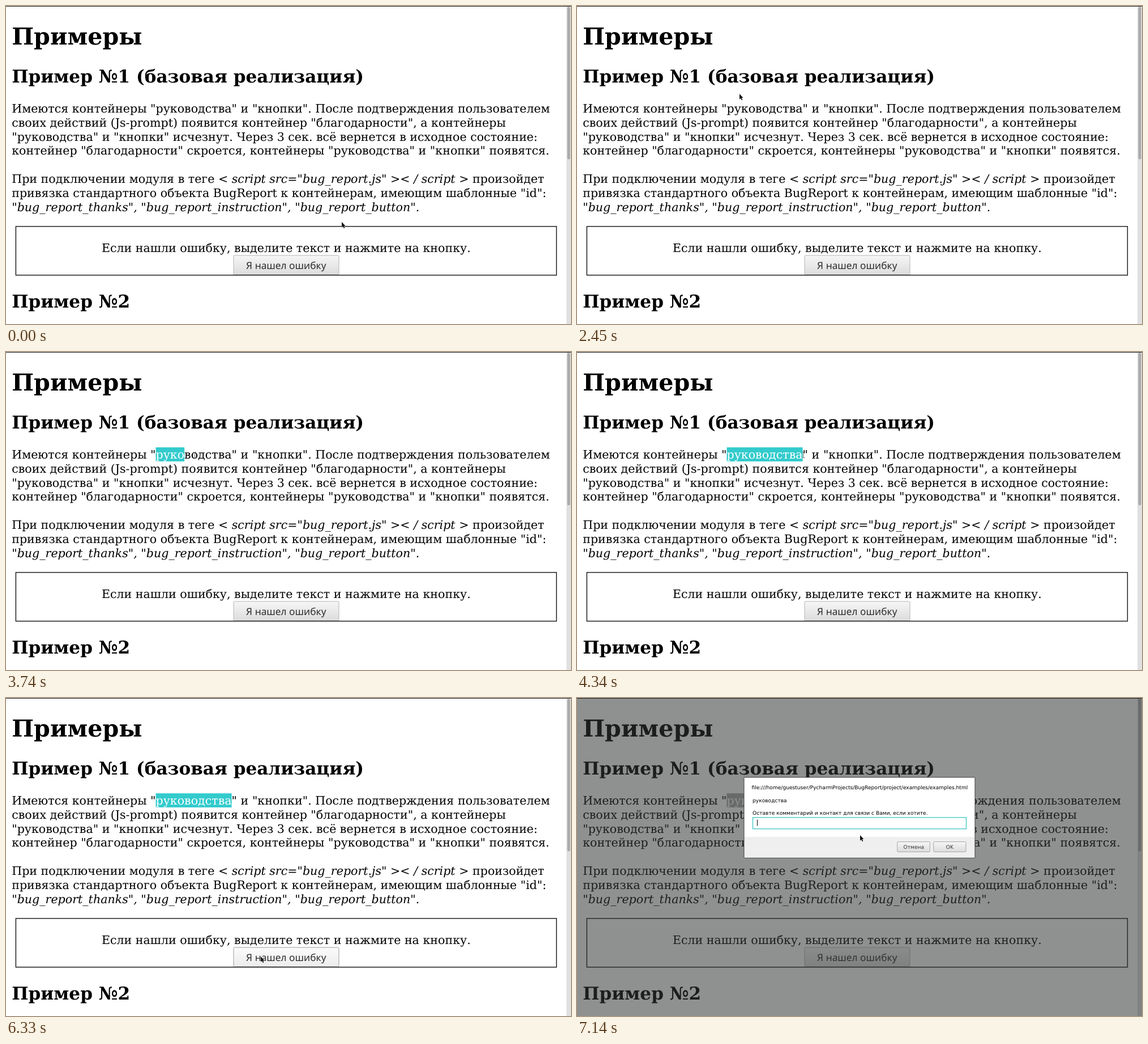
Animation of 998x561 px, one loop 8 s. Source, as an HTML page:

```html
<!DOCTYPE html>
<html lang="ru">
<head>
<meta charset="utf-8">
<title>Примеры</title>
<style>
  html, body { margin: 0; width: 100%; height: 100%; overflow: hidden; background: #fff; }
  svg { display: block; width: 100vw; height: 100vh; }
  text { text-rendering: geometricPrecision; }
  .page { font: 20.6px "DejaVu Serif", serif; }
  .h1 { font-size: 41.2px; font-weight: bold; }
  .h2 { font-size: 31.1px; font-weight: bold; }
  .it { font-style: italic; }
  .mid { text-anchor: middle; }
  .label { font: 17.3px "Noto Sans", "Open Sans", sans-serif; fill: #2c2c2c; }
  .button { fill: url(#face); stroke: #b4b4b4; }
  .pressed .button { fill: url(#light); stroke: #9c9c9c; }
  #mark { fill: #33cbcd; }
  .modal #mark { fill: #aaa; }
  #dialog { font: 9.1px "DejaVu Sans", sans-serif; visibility: hidden; }
  .modal #dialog { visibility: visible; }
  .small { fill: url(#face); stroke: #a6a6a6; }
</style>
</head>
<body>
<svg id="stage" viewBox="0 0 998 561" preserveAspectRatio="none">
  <defs>
    <linearGradient id="face" x2="0" y2="1">
      <stop stop-color="#f6f6f6"/><stop offset="1" stop-color="#dcdcdc"/>
    </linearGradient>
    <linearGradient id="light" x2="0" y2="1">
      <stop stop-color="#fbfbfb"/><stop offset="1" stop-color="#ececec"/>
    </linearGradient>
    <clipPath id="clip"><rect id="clipBox" y="168.2" width="0" height="24.8"/></clipPath>
  </defs>

  <rect width="998" height="561" fill="#fff"/>

  <g class="page">
    <text class="h1" x="10.2" y="68.4">Примеры</text>
    <text class="h2" x="10.2" y="135.2">Пример №1 (базовая реализация)</text>

    <text id="line" x="10.2" y="187.9">Имеются контейнеры "руководства" и "кнопки". После подтверждения пользователем</text>
    <rect id="mark" y="168.2" width="0" height="24.8"/>
    <g clip-path="url(#clip)"><use href="#line" fill="#fff"/></g>

    <text x="10.2" y="212.7">своих действий (Js-prompt) появится контейнер "благодарности", а контейнеры</text>
    <text x="10.2" y="237.6">"руководства" и "кнопки" исчезнут. Через 3 сек. всё вернется в исходное состояние:</text>
    <text x="10.2" y="262.4">контейнер "благодарности" скроется, контейнеры "руководства" и "кнопки" появятся.</text>

    <text x="10.2" y="312.1">При подключении модуля в теге <tspan class="it">&lt; script src="bug_report.js" &gt;&lt; / script &gt;</tspan> произойдет</text>
    <text x="10.2" y="337">привязка стандартного объекта BugReport к контейнерам, имеющим шаблонные "id":</text>
    <text class="it" x="10.2" y="361.8">"bug_report_thanks", "bug_report_instruction", "bug_report_button".</text>

    <text class="mid" x="494.8" y="434">Если нашли ошибку, выделите текст и нажмите на кнопку.</text>
    <rect class="button" x="402" y="440" width="186" height="34" rx="1.5"/>
    <text class="mid label" x="494.8" y="463.8">Я нашел ошибку</text>
    <rect x="17.4" y="388.9" width="955" height="85.9" fill="none" stroke="#111" stroke-width="1.4"/>

    <text class="h2" x="10.2" y="531.6">Пример №2</text>
  </g>

  <rect x="990" width="8" height="561" fill="#e0e0e0"/>
  <rect x="991.5" y="1.5" width="5" height="269" rx="2.5" fill="#ababab"/>

  <g id="dialog">
    <rect width="998" height="561" fill="#333635" fill-opacity=".55"/>
    <rect x="295" y="140" width="408" height="142.3" fill="#fff"/>
    <rect x="295" y="245" width="408" height="37.3" fill="#efefef"/>
    <rect x="295" y="140" width="408" height="142.3" rx="1" fill="none" stroke="#3c3e3d"/>
    <text class="mid" x="499.4" y="161.3">file:///home/guestuser/PycharmProjects/BugReport/project/examples/examples.html</text>
    <text x="310" y="184">руководства</text>
    <text x="310" y="206.2">Оставте комментарий и контакт для связи с Вами, если хотите.</text>
    <rect x="310.5" y="210.8" width="377" height="20" fill="#fff" stroke="#3cc6c4" stroke-width="1.3"/>
    <path d="M318.5 214.5v11" stroke="#000"/>
    <rect class="small" x="565.8" y="253.6" width="57.6" height="17.8" rx="1.5"/>
    <rect class="small" x="629.8" y="253.6" width="57.2" height="17.8" rx="1.5"/>
    <g class="mid" fill="#333">
      <text x="594.8" y="265.7">Отмена</text>
      <text x="658.4" y="265.7">OK</text>
    </g>
  </g>

  <path d="M0 .5H998" stroke="#1a1a1a"/>

  <path id="arrow" d="M0 0V9.8L2.2 7.8L3.8 11.3L5.4 10.5L3.8 7.1H6.5Z" fill="#111" stroke="#fff" stroke-width=".7" paint-order="stroke"/>
  <path id="beam" d="M-2.5 -5H-.6L0 -4.4L.6 -5H2.5M0 -4.4V4.4M-2.5 5H-.6L0 4.4L.6 5H2.5" fill="none" stroke="#555" stroke-width=".9"/>
</svg>

<script>
  const LOOP = 8000, DRAG = 3500, PRESS = 6270, OPEN = 6390, LAG = 80;
  const START = [593, 381];
  const WORD = 'руководства';

  const smooth = u => u * u * (3 - 2 * u);
  const easeOut = u => Math.sin(u * Math.PI / 2);

  // first step, last step, number of steps, end x, end y, easing
  const moves = [
    [1200, 1520, 9, 504, 398, smooth],
    [1840, 2450, 14, 287, 155, smooth],
    [2490, 2610, 4, 272, 167, smooth],
    [2650, 2880, 6, 262, 181, smooth],
    [2925, 3170, 6, 268, 182, smooth],
    [3500, 4300, 21, 399, 181.5, easeOut],
    [4340, 4340, 1, 400, 181.5, smooth],
    [4530, 4680, 3, 400, 182, smooth],
    [4830, 5070, 7, 447.5, 197.5, smooth],
    [5340, 5930, 15, 450, 456, smooth],
    [6580, 7140, 15, 500, 242, smooth]
  ];

  const [stage, line, mark, clipBox, arrow, beam] =
    ['stage', 'line', 'mark', 'clipBox', 'arrow', 'beam'].map(id => document.getElementById(id));
  const first = line.textContent.indexOf(WORD);
  const edge = i => line.getStartPositionOfChar(first + i).x;

  function pointer(t) {
    let [x, y] = START;
    for (const [from, to, steps, endX, endY, ease] of moves) {
      if (t < from) break;
      const gap = (to - from) / (steps - 1) || 1;
      const step = Math.min(steps, Math.floor((t - from) / gap + 1e-6) + 1);
      const u = ease(step / steps);
      x += (endX - x) * u;
      y += (endY - y) * u;
    }
    return [x, y];
  }

  // The selection trails the pointer and snaps to the nearest letter edge.
  function selected(t) {
    if (t < DRAG) return 0;
    const x = pointer(t - LAG)[0];
    let count = 0;
    while (count < WORD.length && x > (edge(count) + edge(count + 1)) / 2) count++;
    return count;
  }

  const overText = y => (y > 168 && y < 366) || (y > 414 && y < 438);

  function draw(now) {
    const t = now % LOOP;
    const [x, y] = pointer(t);
    const modal = t >= OPEN;
    const text = !modal && overText(y);
    for (const [shape, on] of [[arrow, !text], [beam, text]]) {
      shape.setAttribute('transform', `translate(${x} ${y})`);
      shape.style.display = on ? '' : 'none';
    }

    const left = edge(0);
    const width = edge(selected(t)) - left;
    for (const box of [mark, clipBox]) {
      box.setAttribute('x', left);
      box.setAttribute('width', width);
    }

    stage.classList.toggle('pressed', t >= PRESS && !modal);
    stage.classList.toggle('modal', modal);
  }

  const begin = performance.now();
  (function frame() {
    draw(performance.now() - begin);
    requestAnimationFrame(frame);
  })();
</script>
</body>
</html>
```
